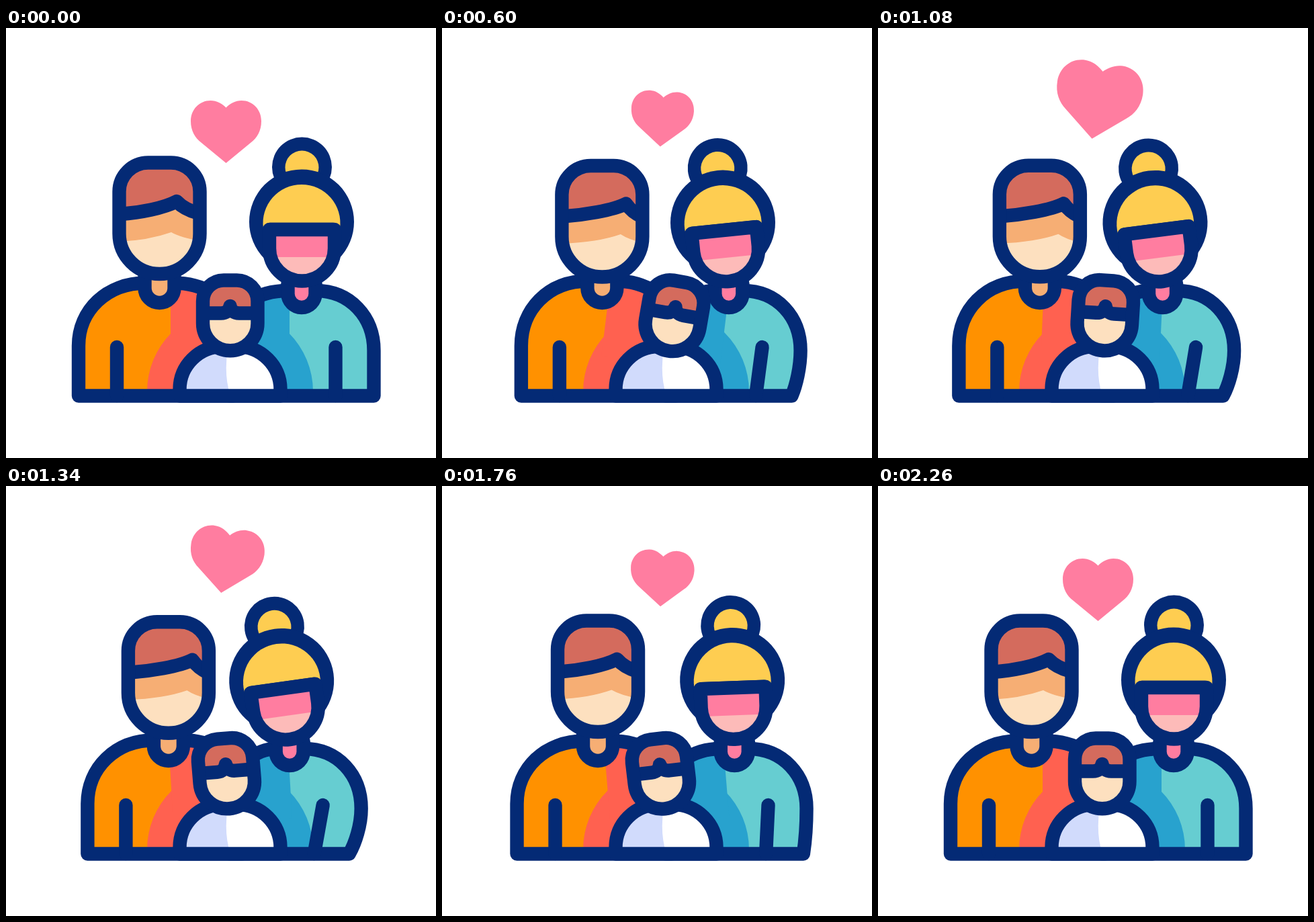
Recreate the animation shown at these times as an HTML page with a canvas. Size 640 px wide and 640 px high, loop 2300 ms.

```html
<!DOCTYPE html>
<html lang="en">
<head>
<meta charset="utf-8">
<title>Family</title>
<style>
  html, body { margin: 0; width: 100%; height: 100%; overflow: hidden; background: #fff; }
  canvas { display: block; }
</style>
</head>
<body>
<canvas width="640" height="640"></canvas>
<script>
const ctx = document.querySelector('canvas').getContext('2d');
const LOOP = 2300;
const NAVY = '#042a75', SKIN = '#fde0bf', TAN = '#f6ae74', HAIR = '#d46b5d',
      PINK = '#ff7da0', BLUSH = '#fdbbb9', YELLOW = '#fecd51';

const HEART = new Path2D('M0-36C-6-42-14-46.5-23-46.5C-40-46.5-52.5-33-52.5-16C-52.5-1-46 9-37 16L0 46.5L37 16C46 9 52.5-1 52.5-16C52.5-33 40-46.5 23-46.5C14-46.5 6-42 0-36Z');
const MAN_COLLAR = new Path2D('M206.5 370V387a22 22 0 0 0 44 0V370');
const MAN_HEAD = new Path2D('M168.5 243.5a43 43 0 0 1 43-43h34a43 43 0 0 1 43 43v62.5a60 60 0 0 1-120 0Z');
const WOMAN_COLLAR = new Path2D('M419.5 380V395.5a20.5 20.5 0 0 0 41 0V380');
const WOMAN_FACE = new Path2D('M392 300V328a48.5 48.5 0 0 0 97 0V300Z');
const KID_BODY = new Path2D('M258.5 547.5V538a64 64 0 0 1 64-64h22a64 64 0 0 1 64 64V547.5Z');
const KID_HEAD = new Path2D('M293 406.5a31 31 0 0 1 31-31h19.5a31 31 0 0 1 31 31v33a40.75 40.75 0 0 1-81.5 0Z');

const ease = p => (1 - Math.cos(Math.PI * Math.min(1, Math.max(0, p)))) / 2;

// Eased interpolation through [time, value] pairs.
function track(t, ...keys) {
  for (let i = 1; i < keys.length; i++) {
    const [t0, a] = keys[i - 1], [t1, b] = keys[i];
    if (t < t1) return a + (b - a) * ease((t - t0) / (t1 - t0));
  }
  return keys[keys.length - 1][1];
}

function fill(shape, color) {
  ctx.fillStyle = color;
  ctx.fill(typeof shape === 'string' ? new Path2D(shape) : shape);
}
function line(shape) {
  ctx.stroke(typeof shape === 'string' ? new Path2D(shape) : shape);
}
function disc(x, y, r, color) {
  ctx.beginPath();
  ctx.arc(x, y, r, 0, 2 * Math.PI);
  ctx.fillStyle = color;
  ctx.fill();
}
function group(paint) {
  ctx.save();
  paint();
  ctx.restore();
}
function clipped(shape, paint) {
  group(() => { ctx.clip(shape); paint(); });
}
function rotate(degrees, x, y) {
  ctx.translate(x, y);
  ctx.rotate(degrees * Math.PI / 180);
  ctx.translate(-x, -y);
}

// The shade the child casts on both parents.
function childShade(tilt, color) {
  disc(333.5, 541, 123.5, color);
  group(() => {
    rotate(tilt * 0.7, 333.5, 430);
    ctx.fillRect(245, 330, 177, 170);
  });
}

function drawMan(sway, nod, turn, tilt) {
  const x = 13.5 * sway, d = 10 * turn, top = 379.5 - 3 * nod;
  const body = new Path2D(`M108 547.5V473C108 420 ${150 - 3 * nod} ${top} 208 ${top}H249C290 ${top} 335 400 338 440V547.5Z`);
  ctx.translate(x, 0);
  fill(body, '#ff9100');
  clipped(body, () => {
    ctx.translate(-x, 0);
    childShade(tilt, '#ff6150');
  });
  line(body);
  line('M165 475V547');
  fill(MAN_COLLAR, TAN);
  line(MAN_COLLAR);

  ctx.translate(0, 4.5 * nod);
  const fringe = `M170 ${277 - turn}C200 ${275 - turn} ${235 + d} ${268 - turn} ${254 + d} ${258 - turn}Q${265 + d * 0.8} 270 287 276`;
  fill(MAN_HEAD, SKIN);
  clipped(MAN_HEAD, () => {
    const y = -1.5 * turn;
    fill(`M168 ${318 + y}Q${212 + d} ${316 + y} ${246 + d} ${304 + y}Q${260 + d * 0.8} ${312 + y} 290 ${317 + y}V200H168Z`, TAN);
    fill(fringe + 'V190H168Z', HAIR);
  });
  line(fringe);
  line(MAN_HEAD);
}

function drawWoman(sway, tilt) {
  const neck = 18 * sway, side = 547.5 - 19 * sway, foot = 547.5 - 37 * sway;
  const body = new Path2D(`M333 547.5V450C336 415 375 391 ${419 - neck} 391H${461 - neck}
    C${512 - neck} 391 ${side} 430 ${side} 480C${side} 505 ${547.5 - 28 * sway} 532 ${foot} 547.5Z`);
  fill(body, '#66cdd1');
  clipped(body, () => childShade(tilt, '#28a2ce'));
  line(body);
  line(`M${490.5 - 19 * sway} 475L${490.5 - 32 * sway} 547`);
  group(() => {
    ctx.translate(-neck, 0);
    fill(WOMAN_COLLAR, PINK);
    line(WOMAN_COLLAR);
  });

  ctx.translate(-30 * sway, 1.5 * sway);
  rotate(-8 * sway, 440, 289);
  disc(440.5, 207, 44.5, NAVY);
  disc(440.5, 207.5, 25, YELLOW);
  disc(440, 288.5, 78, NAVY);
  fill('M383 298A57.5 57.5 0 1 1 497 298Z', YELLOW);
  line('M393 300H487');
  fill(WOMAN_FACE, PINK);
  clipped(WOMAN_FACE, () => {
    ctx.fillStyle = BLUSH;
    ctx.fillRect(380, 341, 120, 50);
  });
  line(WOMAN_FACE);
}

function drawKid(tilt) {
  fill(KID_BODY, '#fff');
  clipped(KID_BODY, () => fill('M333 460Q322 512 334 547H250V460Z', '#d1dbfc'));
  line(KID_BODY);

  rotate(tilt, 333.5, 495);
  const fringe = 'M294 424.5H320Q331 424.5 333.5 414Q336 424.5 347 424.5H373';
  fill(KID_HEAD, SKIN);
  clipped(KID_HEAD, () => fill(fringe + 'V370H293Z', HAIR));
  line(fringe);
  line(KID_HEAD);
}

function drawHeart(t) {
  const phase = Math.PI * t / LOOP;
  const rise = Math.sin(phase - 0.03 * Math.sin(phase)) ** 2.7;
  const size = track(t, [0, 1], [720, 0.88], [1150, 1.25], [1520, 0.87], [2260, 1]);
  ctx.translate(327.5, 154.5 - 47 * rise);
  ctx.rotate(9.3 * rise * Math.PI / 180);
  ctx.scale(size, size);
  fill(HEART, PINK);
}

function draw(t) {
  const sway = t < 1300 ? 0.5 * t / 1300 + 0.5 * ease(t / 500) : 1 - ease((t - 1300) / 700);
  const nod = track(t, [0, 0], [400, 1], [1000, 1], [1600, 0]);
  const turn = track(t, [0, 0], [400, 1], [1340, 1], [2000, 0]);
  const tilt = track(t, [0, 0], [720, 10.6], [1580, -8], [2260, 0]);

  ctx.fillStyle = '#fff';
  ctx.fillRect(0, 0, 640, 640);
  ctx.strokeStyle = NAVY;
  ctx.lineWidth = 20.4;
  ctx.lineCap = ctx.lineJoin = 'round';
  group(() => drawMan(sway, nod, turn, tilt));
  group(() => drawWoman(sway, tilt));
  group(() => drawKid(tilt));
  group(() => drawHeart(t));
}

const start = performance.now();
function frame() {
  draw((performance.now() - start) % LOOP);
  requestAnimationFrame(frame);
}
frame();
</script>
</body>
</html>
```
